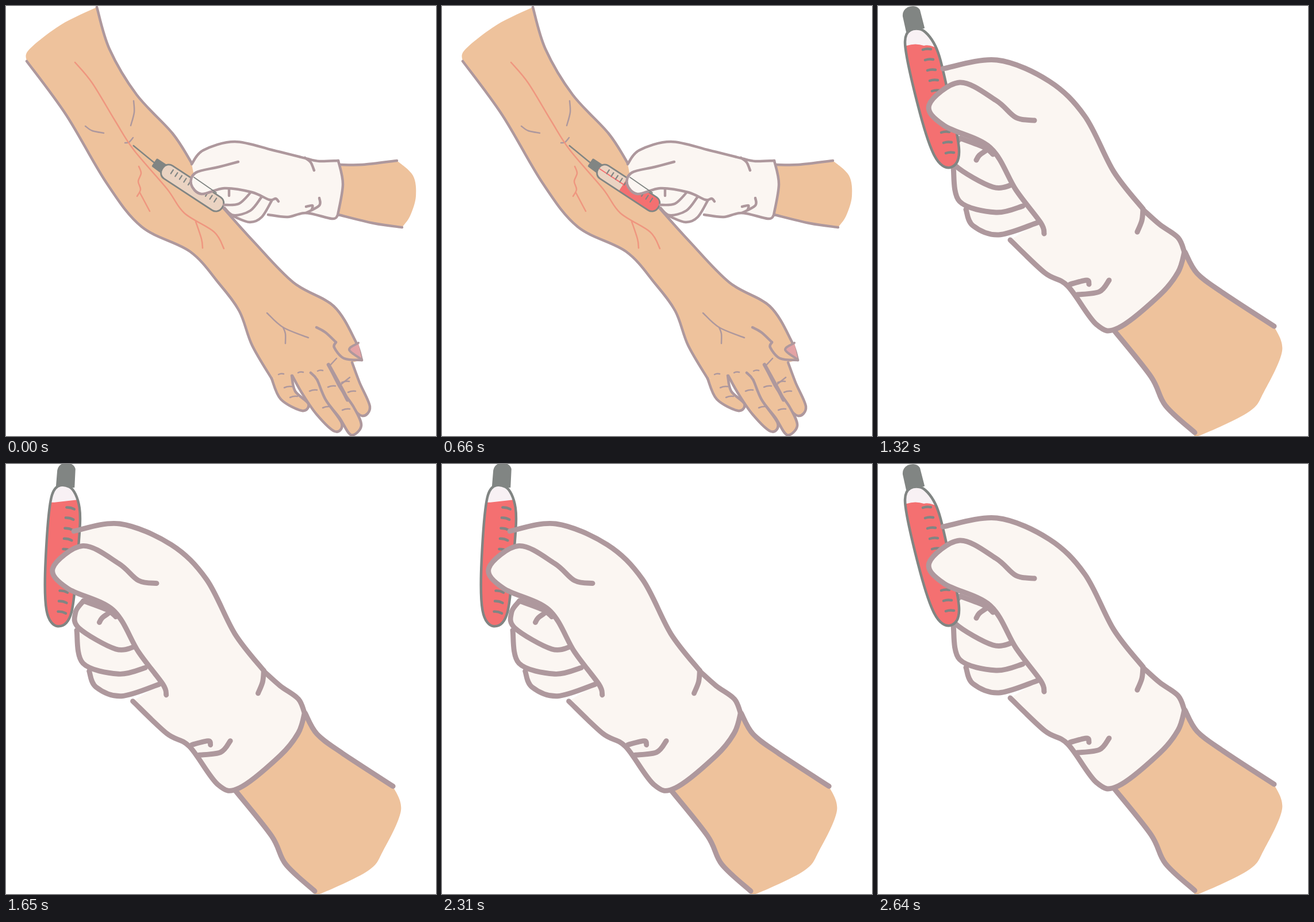
Recreate the animation shown at these times as an HTML page. Size 748 by 748 pixels, loop 2.97 s.

```html
<!DOCTYPE html>
<html lang="en">
<head>
<meta charset="utf-8">
<title>Blood sample</title>
<style>
html, body { margin: 0; width: 100%; height: 100%; overflow: hidden; background: #fff; }
svg { display: block; width: 100%; height: 100%; }
path, rect { stroke-linecap: round; stroke-linejoin: round; }
</style>
</head>
<body>
<svg id="stage" viewBox="0 0 748 748"></svg>
<script>
const SKIN = '#eec29c', LINE = '#ae989d', GLOVE = '#fbf6f2', GREY = '#818583',
      RED = '#f47071', VEIN = '#ef967f';

const back = edge => edge.split(' ').reverse().join(' ');
const loop = (n, f) => Array.from({ length: n }, (_, k) => f(k)).join('');

// Smooth curve through the points of an edge such as "x,y x,y"
function spline(edge, closed) {
  const p = edge.split(' ').map(s => s.split(',').map(Number)), n = p.length;
  const at = i => p[closed ? (i + n) % n : Math.max(0, Math.min(n - 1, i))];
  const bend = (i, k, side) => at(i)[k] + side * (at(i + 1)[k] - at(i - 1)[k]) / 6;
  return p[0] + loop(closed ? n : n - 1, i =>
    `C${[bend(i, 0, 1), bend(i, 1, 1), bend(i + 1, 0, -1), bend(i + 1, 1, -1), ...at(i + 1)]}`);
}
const path = (d, fill, stroke = 'none', w = 0) =>
  `<path d="${d}" fill="${fill}" stroke="${stroke}" stroke-width="${w}"/>`;
// Fill bounded by several smooth edges that meet at corners
const area = (fill, ...edges) => path('M' + edges.map(e => spline(e)).join('L') + 'Z', fill);
const line = (edge, w, color = LINE, fill = 'none') => path('M' + spline(edge), fill, color, w);
const lines = (w, color, ...edges) => edges.map(e => line(e, w, color)).join('');
const dash = (x, y, dx, dy, w, color = LINE) =>
  path(`M${x} ${y}q${dx / 2} ${dy / 2 - 2} ${dx} ${dy}`, 'none', color, w);
const group = (transform, body) => `<g transform="${transform}">${body}</g>`;

function arm() {
  const outer = '36,96 105,190 175,308 236,384 320,427 370,482 406,531 428,590 462,648';
  const upper = '158,2 180,75 227,154 290,222 324,275';
  const lower = '376,349 430,409 500,481 570,522 608,583 619,616';
  const fingers = [
    '561,624 580,660 598,693 620,713 633,697 615,655 602,620',
    '541,650 556,685 580,716 600,746 618,730 605,698 580,662 561,624',
    '498,643 514,672 540,710 572,740 584,726 556,685 541,650 530,638',
    '462,648 478,684 515,704 526,692 503,670 497,643'];
  const joints = [[484, 664, 10, 17], [528, 670, 23, 29], [560, 663, 25, 40], [584, 655, 11, 17]];

  return area(SKIN, upper, lower, '602,620 580,665', '545,665 497,645', back(outer), '36,96 40,76 95,33 158,2')
    + fingers.map(f => line(f, 4.5, LINE, SKIN)).join('')
    + line('561,624 582,662 594,685', 6.5)
    + lines(4.5, LINE, outer, upper, lower, '540,559 556,568 574,585', '574,585 571,594 588,613 619,616')
    + line('613,586 597,598 619,615', 4, LINE, '#e3a3a5')
    + joints.map(([x, y, dx, dy]) => loop(2, k => dash(x + k * dx, y + k * dy, 13, -2, 2.5))).join('')
    + loop(3, k => dash(474 + 34 * k, 641 - 3 * k, 9, -1, 2.5))
    + lines(2.5, LINE, '454,534 482,559 526,577', '482,559 486,570 486,587', '575,613 562,627', '583,658 598,646',
        '222,165 223,185 217,208', '138,209 150,217 170,221', '207,238 214,237 221,229')
    + lines(2.5, VEIN, '120,98 150,134 190,200 222,250 280,318 310,360 362,393 379,422',
        '231,279 235,291 230,305 234,319 228,331', '233,325 250,357', '330,375 340,405 342,421');
}

// Syringe lying along its own x axis; level runs from 0 to 3
function filling(level) {
  const barrel = '<rect y="-14" width="124" height="27" rx="12" ';
  const top = 124 - 36.5 * level;
  return `<clipPath id="barrel">${barrel}/></clipPath>`
    + path('M-64-6L-18-1', 'none', GREY, 2.5)
    + path('M-16-8L2-8V6L-16 5Z', GREY, GREY, 4)
    + barrel + 'fill="#ead3c2"/>'
    + (level ? path(`M2-1H${top}`, 'none', RED, 2)
      + `<g clip-path="url(#barrel)">${path(`M${top}-20H130V20H${top}Z`, RED)}</g>` : '')
    + barrel + `fill="none" stroke="${GREY}" stroke-width="2.8"/>`
    + loop(11, k => path(`M${17 + 9 * k}-1v-7.5`, 'none', GREY, 2.2));
}

function drawing(level) {
  const wristTop = '581,276 620,276 680,269', wristLow = '689,385 640,378 578,363';
  const knuckles = '323,275 343,251 398,236 465,251 525,266';
  const cuff = ['525,266 545,270 578,269', '578,269 586,310 577,364', '577,364 567,370 522,360 490,367 456,363'];
  const lastFinger = '396,366 424,376 445,367 463,337';
  return arm()
    + area(SKIN, wristTop, '680,269 708,295 713,331 703,365 689,385', wristLow)
    + lines(4.5, LINE, wristTop, wristLow)
    + area(GLOVE, knuckles, ...cuff, back(lastFinger), '380,348 330,310')
    + group('translate(272 283) rotate(33.2)', filling(level))
    + lines(4.4, LINE, '379,346 405,344 425,325', '388,317 388,330', '380,351 396,364 425,356 444,333', lastFinger)
    + line('404,271 370,280 330,290 322,310 340,327 380,317 428,324 458,337 469,335 474,340', 4.5, LINE, GLOVE)
    + line('327,298 366,325', 1.8, GREY)
    + lines(4.5, LINE, knuckles, ...cuff, '520,264 530,272 536,286', '545,334 545,347 522,360', '522,349 533,347 532,354');
}

function sample(tilted) {
  const tube = 'M' + spline('47,62 72,40 100,70 119,138 141,250 125,281 98,260 70,175', true);
  const surface = tilted ? 'M30 82L55 74L98 55H160' : 'M30 72L50 69Q65 64 80 69Q90 66 110 77H160';
  return `<clipPath id="barrel">${path(tube)}</clipPath>`
    + path('M44 18Q43 8 52 3Q66-2 72 7L80 38L50 45Z', GREY, GREY, 2)
    + path(tube, '#f8f1f4')
    + `<g clip-path="url(#barrel)">${path(surface + 'V300H30Z', RED)}</g>`
    + path(tube, 'none', GREY, 4.5)
    + loop(11, k => dash(78 + 4 * k, 76 + 18 * k, 14, -1, 4.5, GREY));
}

function holding(tilted) {
  const pose = tilted ? 'translate(-6.2 11.3) scale(.986)' : '';
  const turn = tilted ? 'translate(98.5 142.5) rotate(17.2) scale(.986) translate(-91.5 -143)' : '';
  const wristTop = '534,428 555,465 600,499 689,557', wristLow = '551,742 500,695 475,645 412,566';
  const knuckles = '113,109 207,94 298,131 360,192 410,288 461,353';
  const cuff = ['462,355 490,380 522,403 533,428', '533,428 522,463 490,503 418,560 380,554 330,487 290,464 230,407'];
  const fingers = ['143,230 129,250 135,278 200,315 238,309', '131,282 142,340 205,359 252,348',
                   '153,354 165,382 210,398 277,377'];
  const thumb = '272,199 240,194 205,164 142,133 89,172 115,208 195,246 240,320 283,377 289,396';

  const palm = area(SKIN, wristTop, '689,557 703,600 672,670 645,706 560,747 551,742', wristLow)
    + lines(9, LINE, wristTop, wristLow)
    + area(GLOVE, knuckles, ...cuff, ...fingers.map(back).reverse(), '100,170 118,136')
    + lines(9, LINE, ...cuff, ...fingers, '143,230 185,246 200,258', '187,252 176,260 171,268',
        '334,484 363,477 367,484', '402,477 385,497 347,502');
  const front = line(thumb, 9, LINE, GLOVE)
    + lines(9, LINE, tilted ? knuckles.replace('113,109', '126,107') : knuckles, '461,353 459,373 451,393');
  return group(pose, palm) + group(turn, sample(tilted)) + group(pose, front);
}

const STEP = 330, STEPS = 9;
const stage = document.getElementById('stage');
let shown = -1;
function tick() {
  const step = Math.floor(performance.now() / STEP) % STEPS;
  if (step !== shown) {
    shown = step;
    stage.innerHTML = step < 4 ? drawing(step) : holding(step % 2 === 1);
  }
  requestAnimationFrame(tick);
}
tick();
</script>
</body>
</html>
```
